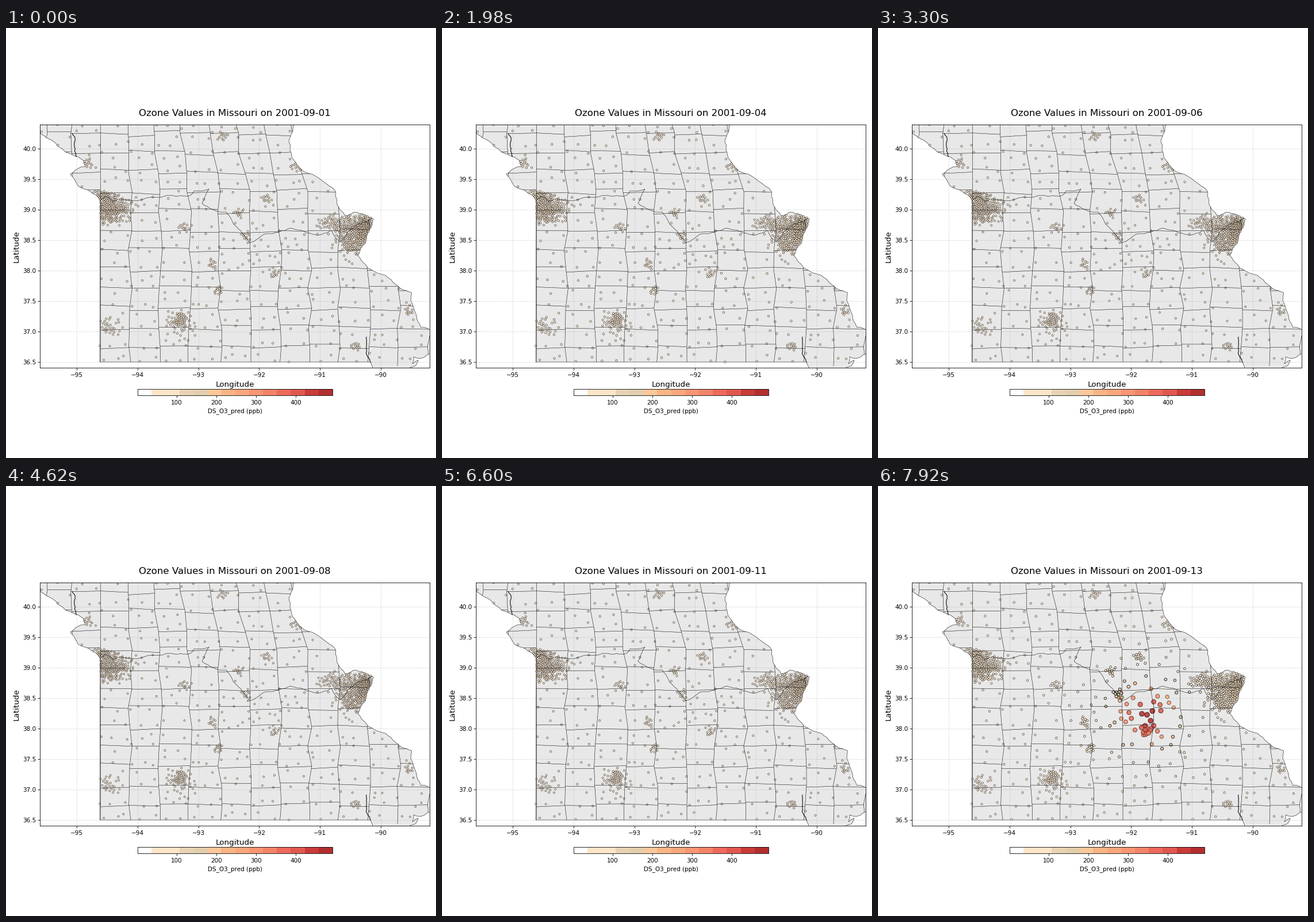
Animation, 748 px wide and 748 px high, one loop 8 s. Source, as a matplotlib script:

```python
import numpy as np
import matplotlib.pyplot as plt
from matplotlib.animation import FuncAnimation
from matplotlib.cm import ScalarMappable
from matplotlib.collections import LineCollection
from matplotlib.colors import BoundaryNorm, ListedColormap
from matplotlib.patches import Polygon
from matplotlib.path import Path

SIZE, DPI = 748, 74.8
LOOP, STEP, HOLD = 8000, 40, 660
LEFT, TOP, SCALE = 59.3, 167.8, 105.87
rng = np.random.default_rng(21)
plt.rcParams["font.family"] = "DejaVu Sans"


def geo(points):
    """Stage pixels to longitude and latitude."""
    x, y = np.asarray(points, float).T
    return np.column_stack([-95.6 + (x - LEFT) / SCALE, 40.4 - (y - TOP) / SCALE])


def wiggle(points, amount=0.1, rounds=3):
    """Roughen a line by shifting segment midpoints sideways."""
    p = np.asarray(points, float)
    for _ in range(rounds):
        step = np.diff(p, axis=0)
        side = np.column_stack([-step[:, 1], step[:, 0]])
        out = np.empty((2 * len(p) - 1, 2))
        out[::2] = p
        out[1::2] = p[:-1] + step / 2 + side * rng.uniform(-amount, amount, (len(step), 1))
        p = out
    return p


# Key points of the state border, in stage pixels.
WEST = [(56, 178), (79, 195), (100, 212), (118, 222), (134, 230), (138, 241),
        (112, 254), (127, 276), (164, 300)]
EAST = [(501, 168), (492, 195), (501, 230), (526, 253), (573, 284), (581, 316),
        (590, 327), (606, 320), (639, 332), (632, 350), (612, 396), (630, 418),
        (669, 437), (689, 455), (705, 460), (704, 474), (712, 495), (722, 521), (741, 527)]
BEND = [(741, 566), (727, 573), (709, 572), (707, 584), (717, 578), (712, 588), (695, 596)]
RIVER = [(164, 300), (172, 293), (187, 302), (200, 297), (231, 300), (296, 293),
         (321, 291), (328, 283), (353, 280), (341, 305), (383, 320), (402, 347),
         (424, 374), (452, 358), (495, 348), (540, 360), (566, 352), (580, 372),
         (600, 350), (637, 331)]
CREEKS = [[(115, 183), (119, 205), (123, 225)], [(627, 537), (627, 560), (635, 582)]]

outline = np.vstack([wiggle(WEST), [(163, 581), (634, 581), (640, 596)],
                     wiggle(BEND)[::-1], wiggle(EAST)[::-1], [(501, 160), (56, 160)]])


def county_lines():
    """Near-square cells whose columns widen to the south."""
    rows = 150 + 33.7 * np.arange(14)
    width = np.interp(rows, [168, 300], [47, 52])
    edges = [164 + k * width + rng.uniform(-4, 4, len(rows)) * bool(k) for k in range(-2, 12)]
    lines = [np.column_stack([edge, rows]) for edge in edges]
    for left, right in zip(edges, edges[1:]):
        for y in rows[1:-1] + rng.uniform(-5, 5, len(rows) - 2):
            tilt = rng.uniform(-1.5, 1.5)
            lines.append([(np.interp(y - tilt, rows, left), y - tilt),
                          (np.interp(y + tilt, rows, right), y + tilt)])
    return [geo(line) for line in lines]


# Site clusters: centre x, centre y, spread x, spread y, count, smallest gap.
CITIES = [(176, 312, 13, 11, 175, 2), (190, 316, 15, 9, 50, 3), (164, 293, 8, 4, 35, 2.5),
          (623, 352, 7, 10, 160, 1.6), (606, 361, 12, 14, 140, 2.4), (578, 341, 14, 5, 50, 3),
          (303, 510, 5, 6, 45, 2.5), (303, 514, 15, 14, 22, 5), (180, 519, 11, 9, 25, 3),
          (468, 400, 40, 27, 36, 9)]
TOWNS = [(404, 322), (418, 361), (141, 236), (700, 494), (309, 347), (609, 553),
         (377, 188), (507, 241), (453, 297), (370, 456), (358, 412), (465, 428)]
HOT = (468, 398)


def place_sites():
    land = Path(outline)
    gx, gy = np.meshgrid(np.arange(70, 740, 23.5), np.arange(174, 592, 23.5))
    rural = np.column_stack([gx.ravel(), gy.ravel()])
    rural += rng.uniform(-8.5, 8.5, rural.shape)
    middle = (abs(rural[:, 0] - 470) < 70) & (abs(rural[:, 1] - 398) < 44)
    rural = rural[~middle]
    sites = [HOT, *rural[land.contains_points(rural)]]
    towns = [(x, y, 4, 3.5, 10, 3) for x, y in TOWNS]
    for x, y, sx, sy, count, gap in CITIES + towns:
        tries = rng.normal((x, y), (sx, sy), (count * 6, 2))
        added = 0
        for p in tries[land.contains_points(tries)]:
            if added < count and np.hypot(*(np.array(sites) - p).T).min() > gap:
                sites.append(p)
                added += 1
    return np.array(sites)


sites = place_sites()
noise = rng.normal(0, 3, len(sites))
hot_distance = np.hypot(*(sites - HOT).T)


def ozone(day):
    """Slow swing over the days, then a sharp peak on the last one."""
    south = (sites[:, 1] - 380) / 200
    value = 53 + 9 * np.sin(2 * np.pi * (day + 0.5) / 10.5) + noise + 4 * np.sin(day) * south
    if day == 12:
        value += 395 * np.exp(-(hot_distance / 47) ** 2) + 45 * np.exp(-(hot_distance / 120) ** 2)
    return np.clip(value, 2, 492)


def box(left, top, right, bottom):
    return [left / SIZE, 1 - bottom / SIZE, (right - left) / SIZE, (bottom - top) / SIZE]


def label(x, y, text, size, **style):
    return fig.text(x / SIZE, 1 - y / SIZE, text, size=size, ha="center", **style)


fig = plt.figure(figsize=(10, 10), dpi=DPI, facecolor="white")
ax = fig.add_axes(box(LEFT, TOP, LEFT + 6.4 * SCALE, TOP + 4 * SCALE))
ax.set(xlim=(-95.6, -89.2), ylim=(36.4, 40.4),
       xticks=range(-95, -89), yticks=np.arange(36.5, 40.1, 0.5))
ax.grid(True, linestyle="--", alpha=0.5)

land = ax.add_patch(Polygon(geo(outline), facecolor="#e8e8e8", edgecolor="black", linewidth=0.5))
for lines, width in [(county_lines() + [geo(wiggle(RIVER))], 0.5),
                     ([geo(wiggle(creek, 0.15, 4)) for creek in CREEKS], 1)]:
    borders = ax.add_collection(LineCollection(lines, colors="black", linewidths=width))
    borders.set_clip_path(land)

COLORS = ["#ffffff", "#fde5c8", "#fde5c8", "#e9d3b3", "#e2cfae", "#fbc89b", "#fab585",
          "#fba77d", "#fb9673", "#f28469", "#ed6a5c", "#e05850", "#c93b38", "#b22f30"]
cmap = ListedColormap(COLORS)
norm = BoundaryNorm(np.linspace(2, 493, len(COLORS) + 1), len(COLORS))
dots = ax.scatter(*geo(sites).T, s=10, alpha=0.85, zorder=1.2)

bar = fig.colorbar(ScalarMappable(norm, cmap), cax=fig.add_axes(box(229, 628, 568, 639.3)),
                   orientation="horizontal", spacing="proportional", ticks=[100, 200, 300, 400])
bar.minorticks_off()

title = label(398, 153, "", 16)
label(398, 624, "Longitude", 13)
label(18, 380, "Latitude", 13, rotation=90, va="center")
label(398.5, 669, "DS_O3_pred (ppb)", 10)


def update(frame):
    day = (frame * STEP + STEP // 2) // HOLD
    value = ozone(day)
    face = cmap(norm(value))
    edge = face * 0.5 * np.clip((value - 120) / 120, 0, 1)[:, None]
    edge[:, 3] = 1
    dots.set_sizes(3 + 0.13 * value)
    dots.set_linewidths(0.5 + 0.7 * np.clip((value - 70) / 100, 0, 1))
    dots.set_facecolor(face)
    dots.set_edgecolor(edge)
    title.set_text(f"Ozone Values in Missouri on 2001-09-{day + 1:02d}")
    return dots, title


animation = FuncAnimation(fig, update, frames=LOOP // STEP, interval=STEP,
                          repeat=True, repeat_delay=0, blit=False)
plt.show()
```
